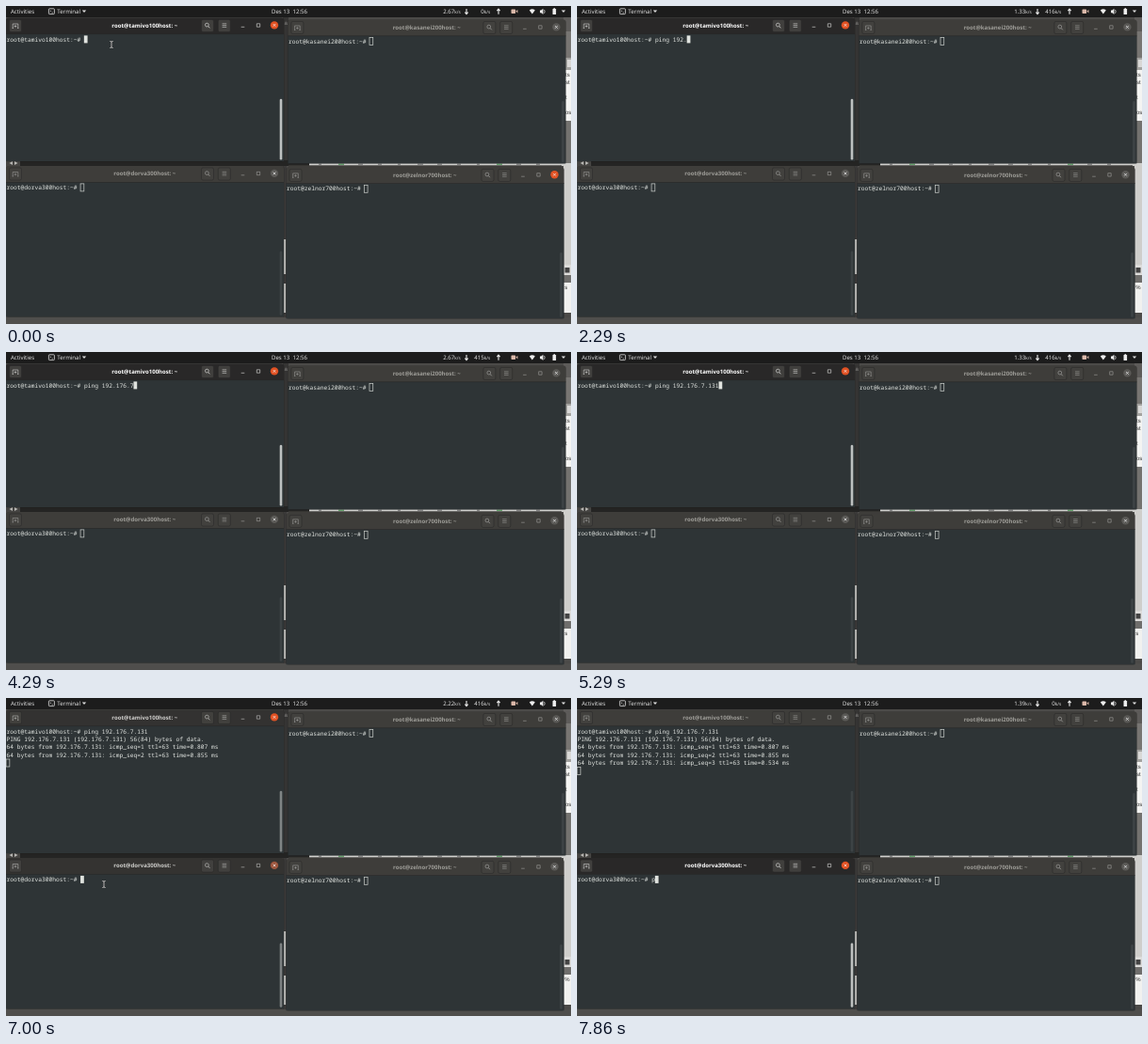
Animation of 600x338 px, one loop 8 s. Source, as an HTML page:

```html
<!DOCTYPE html>
<html lang="en">
<head>
<meta charset="utf-8">
<title>Four terminals</title>
<style>
html, body { margin: 0; width: 100%; height: 100%; overflow: hidden; background: #4b4a48; }
svg { display: block; width: 600px; height: 338px; }
text { white-space: pre; text-rendering: geometricPrecision; }
.mono { font: 6.26px "Noto Sans Mono", "DejaVu Sans Mono", monospace; fill: #e4e7e3; }
.ui { font: 6.1px "Open Sans", "Noto Sans", sans-serif; fill: #ececec; }
.title { font: bold 6.05px "Open Sans", "Noto Sans", sans-serif; text-anchor: middle; }
.tiny { font-size: 4.8px; }
.page { font: 6px "Liberation Sans", Arial, sans-serif; fill: #333; }
</style>
</head>
<body>
<svg id="stage" viewBox="0 0 600 338"></svg>
<script>
const LOOP = 8000, CELL = 3.76, LINE = 8.4;
const stage = document.getElementById('stage');

function add(parent, tag, attrs = {}, text) {
  const el = document.createElementNS('http://www.w3.org/2000/svg', tag);
  for (const k in attrs) el.setAttribute(k, attrs[k]);
  if (text !== undefined) el.textContent = text;
  parent.appendChild(el);
  return el;
}
const rect = (p, x, y, width, height, fill, more) => add(p, 'rect', { x, y, width, height, fill, ...more });
const path = (p, d, stroke, width = 0.7, fill = 'none') => add(p, 'path', { d, stroke, 'stroke-width': width, fill });
const label = (p, x, y, cls, text, more) => add(p, 'text', { x, y, class: cls, ...more }, text);
const show = (el, on) => el.setAttribute('visibility', on ? 'visible' : 'hidden');

// Last entry of a [time, value...] table that has begun
const at = (table, t) => table.reduce((hit, row) => row[0] <= t ? row : hit, table[0]);
const ramp = (t, start) => Math.max(0, Math.min(1, (t - start) / 290));
const mix = (a, b, k) => `rgb(${a.map((v, i) => Math.round(v + (b[i] - v) * k))})`;

function drawDesktop() {
  rect(stage, 0, 0, 600, 338, '#4b4a48');
  rect(stage, 294, 12, 6, 158, '#353433');
  label(stage, 295.4, 20, 'page', 'a', { style: 'fill: #8a8987' });
  rect(stage, 0, 164, 15, 6, '#454442');
  rect(stage, 15, 164, 307, 6, '#242423');
  path(stage, 'M7 165 L3.5 167 L7 169 Z M9 165 L12.5 167 L9 169 Z', 'none', 0, '#b5b4b1');
  rect(stage, 322, 167, 278, 3, '#cfcfcc');
  for (let i = 0; i < 12; i++)
    rect(stage, 332 + i * 21, 167.6, 3 + i * 7 % 4, 1.2, i % 8 === 1 ? '#4e9a56' : '#777');
  // Strip between the lower windows
  rect(stage, 294, 170, 4, 162, '#3b3a39');
  rect(stage, 294.6, 248, 2.6, 37, '#b9b9b6');
  rect(stage, 294.6, 295, 2.6, 31, '#b9b9b6');
  // Pages behind the right edge
  rect(stage, 592, 12, 8, 43, '#5d5b59');
  rect(stage, 592, 27, 8, 28, '#777572');
  rect(stage, 592, 55, 8, 13, '#a4a3a0');
  rect(stage, 596, 57, 4, 8, '#d9d8d6');
  rect(stage, 592, 68, 8, 54, '#f4f4f2');
  [['ts', 74.5], ['st', 82.5], ['t', 98.5], ['os', 114.5]].forEach(([s, y]) => label(stage, 594, y, 'page', s));
  rect(stage, 592, 122, 8, 45, '#73726f');
  rect(stage, 592, 169, 8, 106, '#cfcecb');
  rect(stage, 592, 275, 8, 11, '#dddcda');
  rect(stage, 593.5, 278, 5, 5.5, '#444');
  rect(stage, 592, 286, 8, 8, '#6f6e6c');
  rect(stage, 592, 294, 8, 32, '#f1f1ef');
  rect(stage, 592, 326, 8, 12, '#4b4a48');
  rect(stage, 0, 331, 600, 7, '#4f4e4c');
}

function drawBar() {
  rect(stage, 0, 0, 600, 12, '#1c1c1c');
  label(stage, 5, 8, 'ui', 'Activities');
  rect(stage, 45.4, 2.8, 6, 5.8, 'none', { stroke: '#ddd', 'stroke-width': 0.8, rx: 0.8 });
  path(stage, 'M46.7 4.3 l1.2 1.1 l-1.2 1.1 M48.6 7 h1.5', '#ddd', 0.6);
  label(stage, 54.3, 8, 'ui', 'Terminal');
  path(stage, 'M80.8 4.5 h4.4 l-2.2 2.6 Z', 'none', 0, '#ddd');
  label(stage, 282, 8, 'ui', 'Des 13  12:56');
  path(stage, 'M489 3 V8.6 M487.4 6.6 L489 8.6 L490.6 6.6', '#ececec', 1.1);
  path(stage, 'M523 8.8 V3.2 M521.4 5.2 L523 3.2 L524.6 5.2', '#ececec', 1.1);
  rect(stage, 536.5, 3.6, 4.6, 4.4, '#dcb9aa', { rx: 0.8 });
  path(stage, 'M541.4 5.6 L543.4 4 V7.6 Z', 'none', 0, '#dcb9aa');
  path(stage, 'M555.8 4.4 Q558.8 2 561.8 4.4 L558.8 8.6 Z', 'none', 0, '#ededed');
  path(stage, 'M567 4.6 h1.4 l2 -1.8 v6.2 l-2 -1.8 H567 Z', 'none', 0, '#ededed');
  path(stage, 'M571.5 4 q1.4 1.9 0 3.8', '#ededed');
  rect(stage, 580.5, 3, 3.6, 6, '#ededed', { rx: 0.5 });
  rect(stage, 581.5, 2.2, 1.6, 1, '#ededed');
  path(stage, 'M589.8 4.5 h4.4 l-2.2 2.6 Z', 'none', 0, '#ddd');
  const rate = x => {
    const el = label(stage, x, 8, 'ui', '', { 'text-anchor': 'end' });
    const num = add(el, 'tspan');
    add(el, 'tspan', { class: 'tiny' }, 'k/s');
    return num;
  };
  return [rate(482.8), rate(514.3)];
}

// x: left edge, y: middle of the title bar, h: distance from y to the lower edge
function makeWindow(x, y, h, host) {
  const g = add(stage, 'g', { transform: `translate(${x} ${y})` });
  rect(g, -0.5, -8.2, 296, h + 8.8, '#000', { opacity: 0.22, rx: 3 });
  const bar = path(g, 'M0 9.4 V-7.6 Q0 -10.4 3 -10.4 H292 Q295 -10.4 295 -7.6 V9.4 Z', 'none', 0);
  bar.setAttribute('d', 'M0 9.4 V-5.4 Q0 -8.4 3 -8.4 H292 Q295 -8.4 295 -5.4 V9.4 Z');
  rect(g, 0, 9, 295, h - 9, '#2e3436');
  rect(g, 0, 8.8, 295, 0.5, '#252525');
  const thumb = rect(g, 290.7, h * 0.54, 2.6, h * 0.45, '#fff', { rx: 1.3 });
  const buttons = [[3.5, 13], [207.5, 13], [225.3, 13]].map(([bx, w]) =>
    rect(g, bx, -6.3, w, 13, '#fff', { rx: 1.6, stroke: '#262626', 'stroke-width': 0.5 }));
  const icons = add(g, 'g');
  path(icons, 'M7.2 2.7 V-1.8 H12.8 V2.7 M6.6 2.7 H8 M12 2.7 H13.4 M10 -0.6 V2 M8.7 0.7 H11.3', '#d6d6d4', 0.6);
  add(icons, 'circle', { cx: 213.4, cy: -0.7, r: 1.9, fill: 'none', stroke: '#d6d6d4', 'stroke-width': 0.7 });
  path(icons, 'M214.8 0.8 L216.4 2.5', '#d6d6d4', 0.9);
  path(icons, 'M229.6 -2 h4.6 M229.6 -0.2 h4.6 M229.6 1.6 h4.6', '#d6d6d4', 0.6);
  path(icons, 'M249.7 1.5 h3.6 M266.3 -2 h3.4 v3.4 h-3.4 Z', '#d6d6d4', 0.65);
  const close = add(g, 'circle', { cx: 285, cy: -0.4, r: 4.2 });
  path(g, 'M283.6 -1.8 l2.8 2.8 m0 -2.8 l-2.8 2.8', '#f2f2f2', 0.7);
  const title = label(g, 147.3, 2, 'title', `root@${host}: ~`);
  const prompt = `root@${host}:~# `;
  const lines = Array.from({ length: 5 }, (_, i) => label(g, 0.5, 16.8 + i * LINE, 'mono', ''));
  const cursor = rect(g, 0, 0, CELL, LINE - 0.4, 'none', { 'stroke-width': 0.7 });

  return {
    prompt,
    focus(k) {
      bar.setAttribute('fill', mix([62, 61, 58], [41, 40, 40], k));
      title.setAttribute('fill', mix([158, 157, 152], [255, 255, 255], k));
      icons.setAttribute('opacity', 0.6 + 0.4 * k);
      thumb.setAttribute('fill', mix([61, 67, 69], [190, 193, 192], k));
      buttons.forEach(b => b.setAttribute('fill', mix([66, 65, 62], [64, 63, 61], k)));
    },
    closeColor(k) { close.setAttribute('fill', mix([91, 90, 87], [226, 82, 36], k)); },
    write(rows, solid, visible = true) {
      lines.forEach((el, i) => {
        const s = rows[i] || '';
        if (el.textContent !== s) el.textContent = s;
      });
      const row = rows.length - 1;
      cursor.setAttribute('x', rows[row].length * CELL + 0.1);
      cursor.setAttribute('y', 10.6 + row * LINE);
      cursor.setAttribute('fill', solid ? '#e0e3df' : 'none');
      cursor.setAttribute('stroke', solid ? 'none' : '#ccd0cc');
      show(cursor, visible);
    }
  };
}

drawDesktop();
const mark = label(stage, 593.2, 301.4, 'page', '%');
const right = makeWindow(299.4, 22.8, 144.6, 'kasanei200host');
const main = makeWindow(0, 20.8, 144.2, 'tamivo100host');
const lower = makeWindow(0, 178.3, 152, 'dorva300host');
const corner = makeWindow(297.5, 179.7, 152.5, 'zelnor700host');
// Upper edge of the corner window, just under the light strip
rect(stage, 300, 169.3, 290, 2.2, '#3e3d3a');
const [down, up] = drawBar();
const mouse = add(stage, 'g');
const beam = 'M-1.6 -3.5 Q0 -3.5 0 -2.6 Q0 -3.5 1.6 -3.5 M0 -2.6 V2.6 M-1.6 3.5 Q0 3.5 0 2.6 Q0 3.5 1.6 3.5';
path(mouse, beam, '#111', 1.7);
path(mouse, beam, '#fff', 0.8);

const command = 'ping 192.176.7.131';
const typed = [[0, 0], [570, 1], [860, 2], [1000, 3], [1290, 4], [1430, 5], [1860, 7], [2000, 8], [2290, 9],
  [2430, 10], [2710, 11], [3000, 12], [3570, 13], [4000, 14], [4430, 15], [4710, 16], [5000, 17], [5140, 18]];
const rates = [[0, '2.67', '0'], [290, '825', '416'], [1290, '1.39', '416'], [2290, '1.33', '416'],
  [3290, '2.22', '416'], [4290, '2.67', '415'], [5290, '1.33', '416'], [6290, '2.22', '416'], [7290, '1.39', '0']];
const pointer = [[0, 112, 41], [6140, 112, 60], [6290, 121, 130], [6430, 133, 216], [6570, 138, 249],
  [6710, 124, 230], [6860, 110, 206], [7000, 104, 198]];
const replies = [[5710, '0.807'], [6710, '0.855'], [7710, '0.534']];
const SWITCH = 6860;

right.focus(0);
right.closeColor(0);
corner.focus(0);
right.write([right.prompt], false);
corner.write([corner.prompt], false);

function draw(t) {
  const moved = t >= SWITCH;
  const k = ramp(t, SWITCH);
  main.focus(1 - k);
  lower.focus(k);
  lower.closeColor(k);
  // A close button keeps its colour a little longer than its title bar
  main.closeColor(1 - ramp(t, 7145));
  corner.closeColor(1 - ramp(t, 0));

  const rows = [main.prompt + command.slice(0, at(typed, t)[1])];
  if (t >= replies[0][0]) {
    rows.push('PING 192.176.7.131 (192.176.7.131) 56(84) bytes of data.');
    replies.forEach(([start, ms], i) => {
      if (t >= start) rows.push(`64 bytes from 192.176.7.131: icmp_seq=${i + 1} ttl=63 time=${ms} ms`);
    });
    rows.push('');
  }
  main.write(rows, !moved, !(t >= 6290 && t < SWITCH));
  lower.write([lower.prompt + (t >= 7860 ? 'p' : '')], moved);

  const [, d, u] = at(rates, t);
  down.textContent = d;
  up.textContent = u;
  mark.textContent = (t >= 710 && t < 2860) || t >= 7000 ? '%' : 's';

  const [, mx, my] = at(pointer, t);
  mouse.setAttribute('transform', `translate(${mx} ${my})`);
  show(mouse, t < 570 || (t >= 6140 && t < 7860));
}

const begin = performance.now();
function tick() {
  draw((performance.now() - begin) % LOOP);
  requestAnimationFrame(tick);
}
tick();
</script>
</body>
</html>
```
